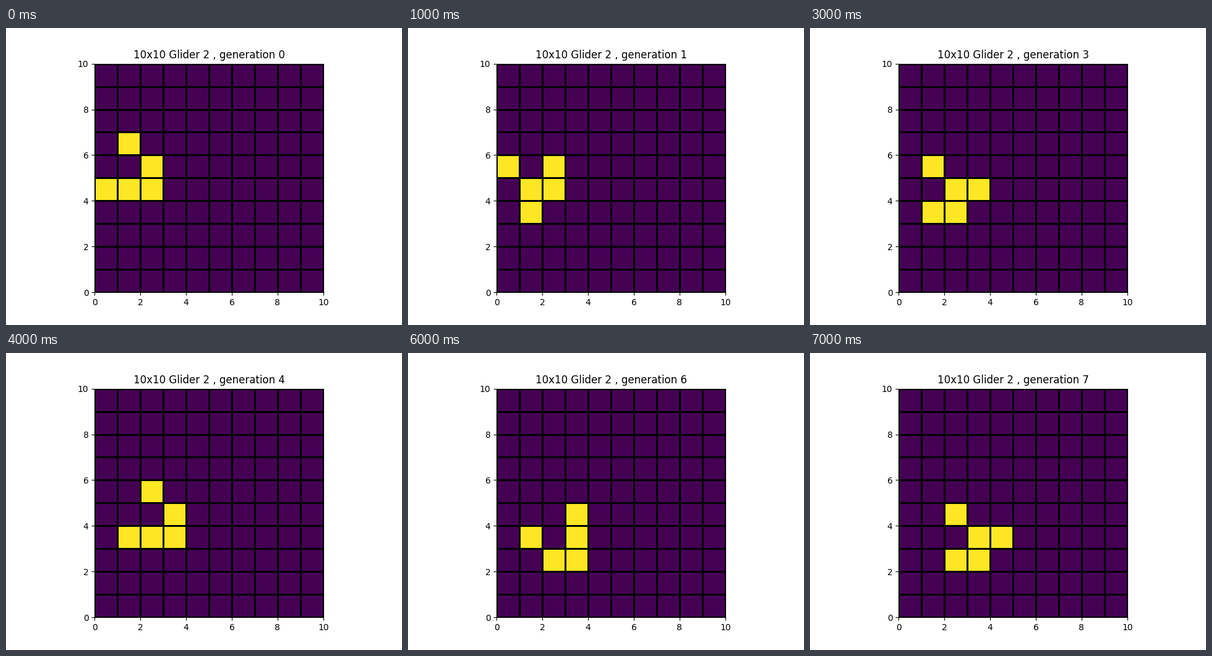
A matplotlib script for the animation above (8 s loop, 640 px wide and 480 px high).

```python
import numpy as np
import matplotlib.pyplot as plt
from matplotlib.animation import FuncAnimation

SIZE = 10
GENERATIONS = 8
SHIFTS = [(dy, dx) for dy in (-1, 0, 1) for dx in (-1, 0, 1) if (dy, dx) != (0, 0)]

plt.rcParams["text.kerning_factor"] = 6


def step(grid):
    """Advance the Game of Life by one generation."""
    around = sum(np.roll(grid, shift, axis=(0, 1)) for shift in SHIFTS)
    return ((around == 3) | ((grid == 1) & (around == 2))).astype(int)


def evolve(grid, count):
    history = [grid]
    while len(history) < count:
        history.append(step(history[-1]))
    return history


start = np.zeros((SIZE, SIZE), dtype=int)
for row, col in [(6, 1), (5, 2), (4, 0), (4, 1), (4, 2)]:
    start[row, col] = 1
history = evolve(start, GENERATIONS)

fig, ax = plt.subplots(figsize=(6.4, 4.8), dpi=100)
ax.set_aspect("equal")
mesh = ax.pcolormesh(start, cmap="viridis", vmin=0, vmax=1,
                     edgecolors="k", linewidth=2)
title = ax.set_title("")


def update(generation):
    mesh.set_array(history[generation])
    title.set_text(f"{SIZE}x{SIZE} Glider 2 , generation {generation}")
    return mesh, title


anim = FuncAnimation(fig, update, frames=GENERATIONS, interval=1000,
                     repeat=True, repeat_delay=0)
plt.show()
```
